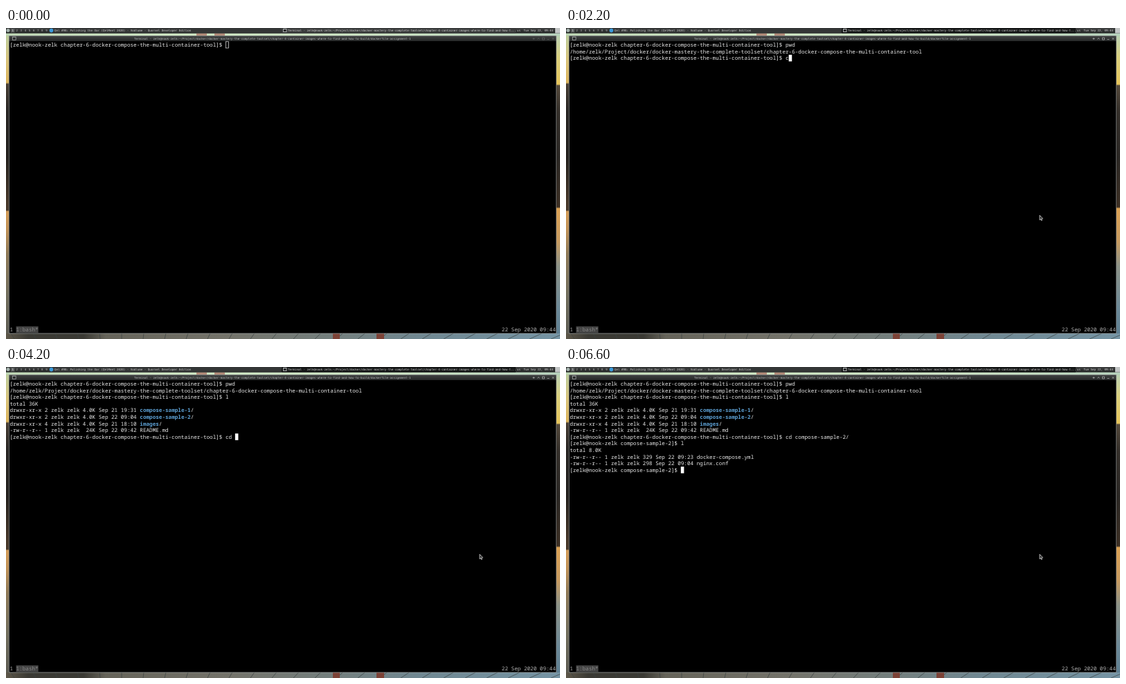
An HTML page with a canvas for the animation above (8 s loop, 800 px wide and 450 px high).

```html
<!DOCTYPE html>
<html lang="en">
<head>
<meta charset="utf-8">
<title>Terminal session</title>
<style>
  html, body { margin: 0; width: 100%; height: 100%; overflow: hidden; background: #000; }
  canvas { display: block; width: 800px; height: 450px; }
</style>
</head>
<body>
<canvas id="stage" width="800" height="450"></canvas>
<script>
const ctx = document.getElementById('stage').getContext('2d');
const LOOP = 8000;
// The desktop is 1920 pixels wide, shown at 800.
const SCALE = 1 / 2.4;
const CELL_W = 11 * SCALE, CELL_H = 23 * SCALE;
const LEFT = 13 * SCALE, TOP = 47 * SCALE;
const TERM_FONT = '18.333px "Noto Sans Mono", monospace';
const SMALL_FONT = '9.967px "DejaVu Sans Mono", monospace';
const WHITE = '#e8e8e8', BLUE = '#5c9fd2';

const USER = 'zelk', HOST = 'nook-zelk';
const COURSE = 'Project/docker/docker-mastery-the-complete-toolset/';
const CHAPTER = 'chapter-6-docker-compose-the-multi-container-tool';
const TITLE = `Terminal - ${USER}@${HOST}:~/${COURSE}chapter-4-container-images-where-to-find-and-how-to-build/dockerfile-assignment-1`;
const BROWSER = 'Qel #98: Polishing the Oar (QelMeet 2020) - Vodlume - Quorvel Developer Edition';

const FOCUS_AT = 1330;
const prompt = dir => `[${USER}@${HOST} ${dir}]$ `;
const entry = (mode, links, size, date, name) =>
  ({ text: `${mode} ${links} ${USER} ${USER} ${size} Sep ${date} `, name, folder: mode[0] === 'd' });

// Each command: when its prompt shows, what is typed when, and what it prints.
const commands = [
  { at: 0, dir: CHAPTER,
    typed: [[1470, 'p'], [1530, 'pw'], [1670, 'pwd']],
    output: [{ text: `/home/${USER}/${COURSE}${CHAPTER}` }] },
  { at: 1800, dir: CHAPTER,
    typed: [[2200, 'c'], [2600, ''], [2800, 'l']],
    output: [
      { text: 'total 36K' },
      entry('drwxr-xr-x', 2, '4.0K', '21 19:31', 'compose-sample-1'),
      entry('drwxr-xr-x', 2, '4.0K', '22 09:04', 'compose-sample-2'),
      entry('drwxr-xr-x', 4, '4.0K', '21 18:10', 'images'),
      entry('-rw-r--r--', 1, ' 24K', '22 09:42', 'README.md')] },
  { at: 3000, dir: CHAPTER,
    typed: [[3470, 'c'], [3600, 'cd'], [4200, 'cd '], [4400, 'cd c'], [4530, 'cd co'],
      [4730, 'cd compose-sample-'], [5130, 'cd compose-sample-2'], [5270, 'cd compose-sample-2/']],
    output: [] },
  { at: 5800, dir: 'compose-sample-2',
    typed: [[6200, 'l']],
    output: [
      { text: 'total 8.0K' },
      entry('-rw-r--r--', 1, '329', '22 09:23', 'docker-compose.yml'),
      entry('-rw-r--r--', 1, '298', '22 09:04', 'nginx.conf')] },
  { at: 6530, dir: 'compose-sample-2', typed: [], output: [] }
];

function rect(x, y, w, h, color) {
  ctx.fillStyle = color;
  ctx.fillRect(x, y, w, h);
}

function dot(x, y, r, color) {
  ctx.fillStyle = color;
  ctx.beginPath();
  ctx.arc(x, y, r, 0, Math.PI * 2);
  ctx.fill();
}

function label(text, x, y, color, font = SMALL_FONT) {
  ctx.save();
  ctx.translate(x, y);
  ctx.scale(SCALE, SCALE);
  ctx.font = font;
  ctx.fillStyle = color;
  ctx.fillText(text, 0, 0);
  ctx.restore();
}

const cellText = (text, col, row, color = WHITE, weight = '') =>
  label(text, LEFT + col * CELL_W, TOP + row * CELL_H + 18 * SCALE, color, weight + TERM_FONT);

function strip(x, y, w, h, stops, across = false) {
  const g = ctx.createLinearGradient(x, y, across ? x + w : x, across ? y : y + h);
  stops.forEach(([p, c]) => g.addColorStop(p, c));
  rect(x, y, w, h, g);
}

function drawWallpaper() {
  strip(0, 7.5, 800, 4, [[0, '#bdd5b4'], [.3, '#cbe2c0'], [.7, '#c8dfc0'], [1, '#b5d0bb']], true);
  rect(275, 7.5, 15, 4, '#b08a78');
  rect(301, 7.5, 15, 4, '#b08a78');
  strip(0, 11, 5, 439, [[0, '#bccd9c'], [.08, '#d8c37a'], [.155, '#dcb45c'], [.16, '#4a4036'],
    [.25, '#2a2725'], [.4, '#25221f'], [.55, '#4a3a2c'], [.575, '#4a3a2c'], [.58, '#d39c58'],
    [.64, '#c09258'], [.72, '#8f7a58'], [.85, '#74705f'], [1, '#5b5a52']]);
  strip(794, 11, 6, 439, [[0, '#b9d0b4'], [.07, '#d9cf7e'], [.16, '#e6c459'], [.165, '#54493b'],
    [.25, '#35302b'], [.4, '#2b2825'], [.565, '#3d3025'], [.57, '#dba154'],
    [.68, '#c69a60'], [.76, '#8c9287'], [.9, '#6c8998'], [1, '#5c7d90']]);
  strip(0, 442, 800, 8, [[0, '#5e584a'], [.04, '#3b3a34'], [.14, '#3b3a34'], [.18, '#66645a'],
    [.4, '#74736a'], [.6, '#74807f'], [.75, '#708892'], [1, '#7594a4']], true);
  ctx.lineWidth = .7;
  ctx.strokeStyle = '#3c4342';
  for (let i = 0; i < 26; i++) {
    const x = 12 + i * 31;
    ctx.beginPath();
    ctx.moveTo(x, 450);
    ctx.lineTo(x + (400 - x) * -.03 + 7, 442);
    ctx.stroke();
  }
  rect(472, 442, 10, 8, '#7c4236');
  rect(535, 442, 11, 8, '#7c4236');
}

function drawPanel(focused) {
  strip(0, 0, 800, 7.5, [[0, '#424444'], [.5, '#303232'], [1, '#252727']]);
  rect(62, 0, 335, 7.5, '#343636');
  rect(398, 0, 338, 7.5, focused ? '#161818' : '#3a3c3c');
  dot(3, 3.5, 2.5, '#a5b3ae');
  rect(7, 1, 5.5, 5.5, '#565959');
  for (let n = 1; n < 10; n++) label(n, 2.3 + n * 6.1, 5, n === 1 ? '#fff' : '#b6b6b6');
  dot(65.5, 3.6, 2.8, '#3b9adb');
  label(BROWSER, 70, 5, '#c9c9c9');
  rect(400, 1, 5.5, 5, '#b8bcbc');
  rect(400.8, 2, 3.9, 3.2, '#242626');
  label(TITLE.slice(0, 129) + '...', 407, 5, '#d2d2d2');
  label('us', 738, 5, '#c5c5c5');
  label('Tue Sep 22, 09:44', 747.5, 5, '#d0d0d0');
  rect(793, 0, 7, 7.5, '#c2c5c5');
}

function drawWindow(t) {
  rect(4, 11, 791, 431.3, '#a4a8a8');
  strip(4.6, 11.5, 789.8, 7.5, [[0, '#404242'], [1, '#262828']]);
  rect(4.6, 19, 789.8, 422.6, '#000');
  rect(9, 12.6, 5.5, 5, '#b8bcbc');
  rect(9.7, 13.5, 4.1, 3.4, '#242626');
  label(TITLE, 185, 17, '#bfc2c2');
  ctx.strokeStyle = t < 70 ? '#5d6060' : '#b5b8b8';
  ctx.lineWidth = .7;
  ctx.beginPath();
  ctx.moveTo(760.5, 15.5); ctx.lineTo(763.5, 15.5);
  ctx.moveTo(762, 14); ctx.lineTo(762, 17);
  ctx.moveTo(767.5, 16.5); ctx.lineTo(769, 14.5); ctx.lineTo(770.5, 16.5);
  ctx.rect(774.5, 14, 3, 3);
  ctx.moveTo(781.5, 16.5); ctx.lineTo(784.5, 16.5);
  ctx.moveTo(788.5, 14); ctx.lineTo(791.5, 17);
  ctx.moveTo(791.5, 14); ctx.lineTo(788.5, 17);
  ctx.stroke();
}

function drawCursor(col, row, solid) {
  const x = LEFT + col * CELL_W, y = TOP + row * CELL_H;
  if (solid) return rect(x, y, CELL_W, CELL_H, '#fff');
  ctx.strokeStyle = '#eee';
  ctx.lineWidth = .7;
  ctx.strokeRect(x + .2, y + .2, CELL_W - .4, CELL_H - .4);
}

function drawOutput({ text, name, folder }, row) {
  cellText(text, 0, row);
  if (!name) return;
  cellText(name, text.length, row, folder ? BLUE : WHITE, folder ? 'bold ' : '');
  if (folder) cellText('/', text.length + name.length, row);
}

function drawTerminal(t) {
  let row = 0;
  commands.forEach((command, i) => {
    if (t < command.at) return;
    const typed = command.typed.filter(([at]) => t >= at).pop();
    const line = prompt(command.dir) + (typed ? typed[1] : '');
    cellText(line, 0, row);
    const next = commands[i + 1];
    if (next && t >= next.at) {
      row++;
      command.output.forEach(out => drawOutput(out, row++));
    } else {
      drawCursor(line.length, row, t >= FOCUS_AT);
    }
  });
}

function drawStatus() {
  cellText('1', 0, 43, '#b0b0b0');
  rect(LEFT + 2 * CELL_W, TOP + 43 * CELL_H, 7 * CELL_W, CELL_H, '#444');
  cellText('1:bash*', 2, 43, '#8a8a8a');
  cellText('22 Sep 2020 09:44', 155, 43, '#b0b0b0');
}

function drawPointer(t) {
  if (t < 70) return;
  const left = Math.pow(1 - Math.min(1, (t - 70) / 380), 3);
  ctx.save();
  ctx.translate(684 + 116 * left, 271 + 24 * left);
  ctx.beginPath();
  [[0, 0], [0, 6.8], [1.5, 5.4], [2.5, 7.7], [3.5, 7.2], [2.5, 5], [4.5, 4.8]]
    .forEach(([x, y]) => ctx.lineTo(x, y));
  ctx.closePath();
  ctx.fillStyle = '#202020';
  ctx.strokeStyle = '#e0e0e0';
  ctx.lineWidth = .8;
  ctx.fill();
  ctx.stroke();
  ctx.restore();
}

function draw(t) {
  ctx.textRendering = 'geometricPrecision';
  drawWallpaper();
  drawPanel(t >= FOCUS_AT);
  drawWindow(t);
  drawTerminal(t);
  drawStatus();
  drawPointer(t);
}

const start = performance.now();
function tick() {
  draw((performance.now() - start) % LOOP);
  requestAnimationFrame(tick);
}
tick();
</script>
</body>
</html>
```
